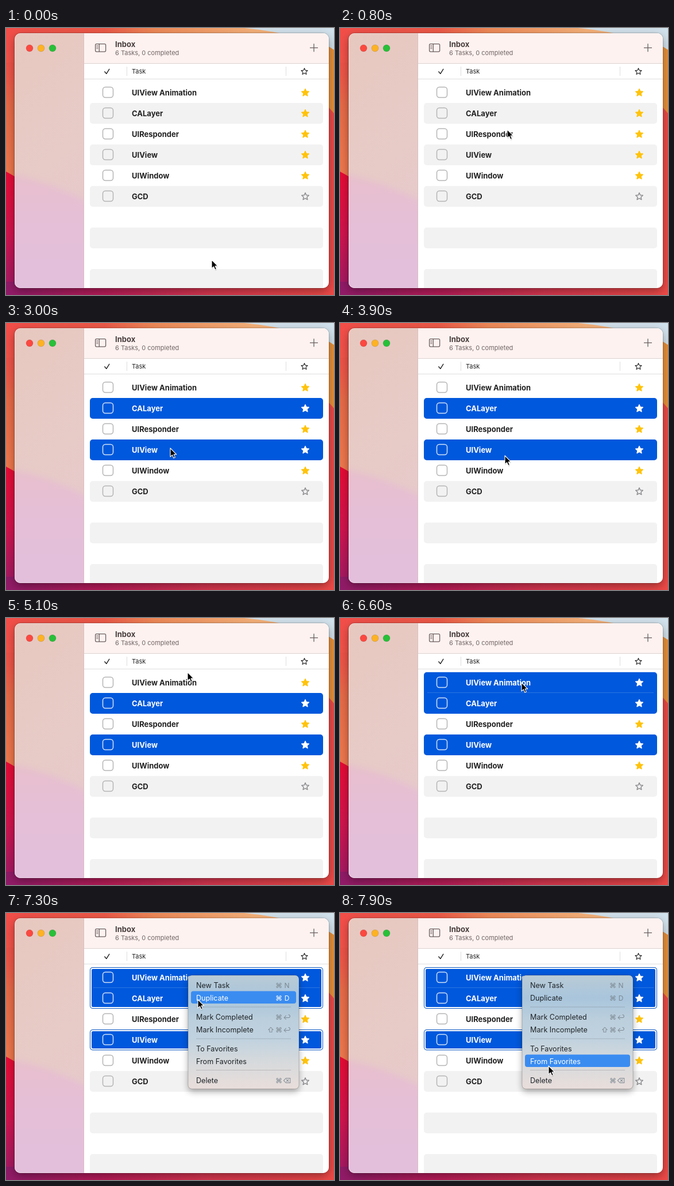
These frames come from a looping animation (571 by 463 pixels, 8 s). An HTML page:

```html
<!DOCTYPE html>
<html lang="en">
<head>
<meta charset="utf-8">
<title>Task list</title>
<style>
html, body { margin: 0; width: 571px; height: 463px; overflow: hidden; }
svg { display: block; font-family: Inter, Roboto, sans-serif; cursor: default; }
.b { font-weight: 700; font-size: 13px; }
.small { font-size: 11px; }
.item { font-size: 12.6px; }
.key { font-size: 12px; font-family: Inter, "DejaVu Sans", sans-serif; text-anchor: middle; }

.anim { animation: 8s step-end infinite; }
.sel, .late, .hover { opacity: 0; }
.sel1 { animation-name: pick1; }
.sel2 { animation-name: pick2; }
.sel4 { animation-name: pick4; }
.late { animation-name: menu; }
.hover { animation-name: pass; }
.hover.stay { animation-name: stay; }
#arrow { animation-name: mouse; }

@keyframes pick1 { 0% { opacity: 0 } 72.5% { opacity: 1 } }
@keyframes pick2 { 0% { opacity: 0 } 21.25% { opacity: 1 } }
@keyframes pick4 { 0% { opacity: 0 } 37.5% { opacity: 1 } }
@keyframes menu { 0% { opacity: 0 } 83.75% { opacity: 1 } }
@keyframes pass { 0% { opacity: 1 } 1.25%, 100% { opacity: 0 } }
@keyframes stay { 0% { opacity: 1 } 5%, 100% { opacity: 0 } }
@keyframes mouse {
  0% { transform: translate(358px, 402px) }
  1.25% { transform: translate(356px, 396px) }
  2.5% { transform: translate(350px, 379px) }
  3.75% { transform: translate(340px, 347px) }
  5% { transform: translate(328px, 305px) }
  6.25% { transform: translate(315px, 262px) }
  7.5% { transform: translate(304px, 225px) }
  8.75% { transform: translate(296px, 196px) }
  10% { transform: translate(291px, 176px) }
  11.25% { transform: translate(288px, 163px) }
  12.5% { transform: translate(286px, 155px) }
  13.75% { transform: translate(286px, 153px) }
  23.75% { transform: translate(286px, 170px) }
  25% { transform: translate(286px, 202px) }
  26.25% { transform: translate(286px, 217px) }
  42.5% { transform: translate(286px, 230px) }
  43.75% { transform: translate(286px, 247px) }
  45% { transform: translate(286px, 254px) }
  48.75% { transform: translate(287px, 230px) }
  50% { transform: translate(288px, 205px) }
  51.25% { transform: translate(291px, 178px) }
  52.5% { transform: translate(295px, 153px) }
  53.75% { transform: translate(300px, 134px) }
  55% { transform: translate(304px, 124px) }
  57.5% { transform: translate(306px, 119px) }
  58.75% { transform: translate(309px, 110px) }
  60% { transform: translate(312px, 102px) }
  61.25% { transform: translate(314px, 97px) }
  62.5% { transform: translate(315px, 95px) }
  63.75% { transform: translate(316px, 94px) }
  68.75% { transform: translate(316px, 104px) }
  70% { transform: translate(316px, 112px) }
  90% { transform: translate(322px, 122px) }
  91.25% { transform: translate(334px, 150px) }
  92.5% { transform: translate(348px, 200px) }
  93.75% { transform: translate(358px, 242px) }
  95% { transform: translate(363px, 265px) }
}
</style>
</head>
<body>
<svg width="571" height="463" viewBox="0 0 571 463">
  <defs>
    <linearGradient id="top" gradientUnits="userSpaceOnUse" x1="0" x2="430" y1="0" y2="0">
      <stop offset="0" stop-color="#f24e49"/><stop offset=".4" stop-color="#ee5a48"/>
      <stop offset=".6" stop-color="#f08a58"/><stop offset="1" stop-color="#f7b27a"/>
    </linearGradient>
    <linearGradient id="left" x1="0" x2="0" y1="0" y2="1">
      <stop offset="0" stop-color="#f24e49" stop-opacity="0"/><stop offset=".5" stop-color="#e66a48"/>
      <stop offset="1" stop-color="#ee7a4e"/>
    </linearGradient>
    <linearGradient id="low" gradientUnits="userSpaceOnUse" x1="0" x2="0" y1="250" y2="463">
      <stop offset="0" stop-color="#e60b35"/><stop offset=".5" stop-color="#d0144e"/>
      <stop offset="1" stop-color="#9c1b66"/>
    </linearGradient>
    <linearGradient id="floor" gradientUnits="userSpaceOnUse" x1="0" x2="571" y1="0" y2="0">
      <stop offset="0" stop-color="#8f1b68"/><stop offset=".3" stop-color="#b81c58"/>
      <stop offset=".62" stop-color="#d8374f"/><stop offset="1" stop-color="#ec4a47"/>
    </linearGradient>
    <linearGradient id="side" x1="0" x2=".25" y1="0" y2="1">
      <stop offset="0" stop-color="#e7c8bf"/><stop offset=".6" stop-color="#e7cbc7"/>
      <stop offset="1" stop-color="#e6c8cc"/>
    </linearGradient>
    <linearGradient id="sideLow" gradientUnits="userSpaceOnUse" x1="0" x2="0" y1="240" y2="451">
      <stop offset="0" stop-color="#e8bfcb"/><stop offset=".4" stop-color="#e5bfd6"/>
      <stop offset="1" stop-color="#e3bfdd"/>
    </linearGradient>
    <linearGradient id="glass" x1="0" x2="0" y1="0" y2="1">
      <stop offset="0" stop-color="#b9cbd6"/><stop offset=".2" stop-color="#a9c5dc"/>
      <stop offset=".4" stop-color="#bccfdc"/><stop offset=".56" stop-color="#c0d2df"/>
      <stop offset=".75" stop-color="#d5d9dc"/><stop offset="1" stop-color="#e9dedb"/>
    </linearGradient>
    <filter id="soft" x="-20%" y="-20%" width="140%" height="140%"><feGaussianBlur stdDeviation="8"/></filter>
    <filter id="mist" x="-20%" y="-20%" width="140%" height="140%"><feGaussianBlur stdDeviation="6"/></filter>
    <clipPath id="frame"><rect x="15" y="9" width="547" height="442" rx="10"/></clipPath>
  </defs>

  <!-- desktop -->
  <rect width="571" height="463" fill="#ec4a47"/>
  <rect width="571" height="60" fill="url(#top)"/>
  <rect width="60" height="265" fill="url(#left)"/>
  <path d="M415 0H571V38Q500 8 415 0Z" fill="#d2e2ec"/>
  <path d="M540 22Q560 30 571 38V148Q556 130 540 120Z" fill="#e8913a"/>
  <path d="M0 249Q60 280 110 340T260 463H0Z" fill="url(#low)"/>
  <rect y="440" width="571" height="23" fill="url(#floor)"/>

  <!-- window -->
  <rect x="15" y="14" width="547" height="442" rx="10" opacity=".36" filter="url(#soft)"/>
  <rect x="14.5" y="8.5" width="548" height="443" rx="10.5" fill="none" stroke="#000" stroke-opacity=".16"/>
  <g clip-path="url(#frame)">
    <rect x="15" y="9" width="121" height="442" fill="url(#side)"/>
    <path d="M0 252Q70 262 150 306V470H0Z" fill="url(#sideLow)" filter="url(#mist)"/>
    <path d="M135.5 9V451" stroke="#d9bfc0"/>
    <rect x="136" y="9" width="426" height="442" fill="#fff"/>
    <rect x="136" y="9" width="426" height="52" fill="#fdf2f0"/>
    <path d="M136 61.5H562" stroke="#ddd2d0"/>
    <path d="M136 88.5H562M210.500 67V83M487.500 67V83" stroke="#dedede"/>
    <g id="rows"></g>
  </g>
  <rect x="15.500" y="9.500" width="546" height="441" rx="9.500" fill="none" stroke="#fff" stroke-opacity=".28"/>
  <g stroke="#000" stroke-opacity=".12">
    <circle cx="41" cy="35" r="6" fill="#fc4840"/>
    <circle cx="61" cy="35" r="6" fill="#fdb224"/>
    <circle cx="81" cy="35" r="6" fill="#27c038"/>
  </g>
  <g fill="none" stroke="#6a6060" stroke-width="1.3">
    <rect x="155.600" y="27.600" width="18" height="13.500" rx="2"/>
    <path d="M162.300 28V41M529 34.300H543M536 27.300V41.300"/>
    <path d="M157.300 30.700H160.500M157.300 33.200H160.500M157.300 35.700H160.500" stroke-width="1"/>
  </g>
  <text class="b" x="190" y="33" fill="#453c3b">Inbox</text>
  <text class="small" x="190" y="47" fill="#706665">6 Tasks, 0 completed</text>
  <text class="small" x="219" y="79" fill="#222">Task</text>
  <path d="M171.800 75.800L174.800 79.300L179.800 71.300" fill="none" stroke="#222" stroke-width="1.400" stroke-linecap="round" stroke-linejoin="round"/>
  <g id="head"></g>

  <!-- focus rings -->
  <g class="anim late" fill="none">
    <rect x="147.500" y="95.500" width="403" height="69" rx="4" stroke="#fff" stroke-width="3"/>
    <rect x="147.500" y="203.500" width="403" height="33" rx="4" stroke="#fff" stroke-width="3"/>
    <rect x="146.500" y="94.500" width="405" height="71" rx="4.500" stroke="#0a55c0"/>
    <rect x="146.500" y="202.500" width="405" height="35" rx="4.500" stroke="#0a55c0"/>
  </g>

  <g class="anim late">
    <rect x="317" y="113" width="193" height="197" rx="7" opacity=".32" filter="url(#mist)"/>
    <rect x="317" y="108" width="193" height="197" rx="6.500" fill="url(#glass)" stroke="#000" stroke-opacity=".2"/>
    <path d="M331 163H496M331 218H496M331 272.500H496" stroke="#000" stroke-opacity=".15"/>
    <g id="items"></g>
  </g>

  <g id="arrow" class="anim">
    <path d="M0 0V15L3.500 11.800L5.900 17.200L8.400 16.100L6.100 10.900H10.700Z" transform="translate(.5 1.500)" opacity=".22"/>
    <path d="M0 0V15L3.500 11.800L5.900 17.200L8.400 16.100L6.100 10.900H10.700Z" stroke="#fff" stroke-width="1.100" stroke-linejoin="round"/>
  </g>
</svg>
<script>
const put = (id, html) => { document.getElementById(id).innerHTML = html; };
const BLUE = '#0058dc';

function star(cx, cy, r, fill, stroke, width) {
  const pts = Array.from({ length: 10 }, (_, i) => {
    const a = i * Math.PI / 5, d = i % 2 ? r * 0.46 : r;
    return `${(cx + d * Math.sin(a)).toFixed(2)},${(cy - d * Math.cos(a)).toFixed(2)}`;
  });
  return `<polygon points="${pts.join(' ')}" fill="${fill}" stroke="${stroke}" stroke-width="${width}" stroke-linejoin="round"/>`;
}

const bar = (y, fill) => `<rect x="146" y="${y}" width="406" height="36" rx="5" fill="${fill}"/>`;

function cells(name, y, text, box, mark) {
  return `<rect x="168.500" y="${y + 8.5}" width="18" height="18" rx="4.500" fill="none" stroke="${box}" stroke-width="1.500"/>
    <text class="b" x="219" y="${y + 23}" fill="${text}">${name}</text>${mark}`;
}

const tasks = ['UIView Animation', 'CALayer', 'UIResponder', 'UIView', 'UIWindow', 'GCD'];
const solid = (y, color) => star(521, y + 18.3, 6.6, color, color, 1.6);
let rows = '';
for (let i = 0; i < 10; i++) {
  const y = 94 + 36 * i, name = tasks[i];
  if (i % 2) rows += bar(y, '#f2f2f2');
  if (!name) continue;
  const mark = i < 5 ? solid(y, '#ffc30b') : star(521, y + 18.3, 6.6, 'none', '#8e8e92', 1.5);
  rows += cells(name, y, '#222', '#b4b4b4', mark);
}
for (const n of [2, 4, 1]) {
  const y = 58 + 36 * n;
  const join = n > 1 ? '' : `<rect x="146" y="124" width="406" height="12" fill="${BLUE}"/>
    <path d="M152 129.500H546" stroke="#2a74e2"/>`;
  rows += `<g class="anim sel sel${n}">${bar(y, BLUE)}${join}${cells(tasks[n - 1], y, '#fff', '#d3e1f8', solid(y, '#fff'))}</g>`;
}
put('rows', rows);
put('head', star(519.500, 75.6, 5.9, 'none', '#222', 1.1));

// label, centre line, shortcut keys, time of hover in ms
const items = [
  ['New Task', 125, '⌘N', 7200],
  ['Duplicate', 147, '⌘D', 7300],
  ['Mark Completed', 180, '⌘↩'],
  ['Mark Incomplete', 202, '⇧⌘↩', 7400],
  ['To Favorites', 235, '', 7500],
  ['From Favorites', 257, '', 7600],
  ['Delete', 290, '⌘⌫']
];

function entry([label, y, keys], ink, dim) {
  const glyphs = [...keys].reverse().map((k, i) =>
    `<text class="key" x="${489 - 14 * i}" y="${y + 4.5}" fill="${dim}">${k}</text>`);
  return `<text class="item" x="331" y="${y + 4.5}" fill="${ink}">${label}</text>${glyphs.join('')}`;
}

put('items', items.map(it => {
  const [label, y, , at] = it;
  const plain = entry(it, '#1f2428', '#7c8891');
  if (!at) return plain;
  const stay = at === 7600 ? ' stay' : '';
  return `${plain}<g class="anim hover${stay}" style="animation-delay:${at - 8000}ms">
    <rect x="322" y="${y - 11.5}" width="183" height="21.500" rx="4" fill="#3a8cf1"/>${entry(it, '#fff', '#fff')}</g>`;
}).join(''));
</script>
</body>
</html>
```
